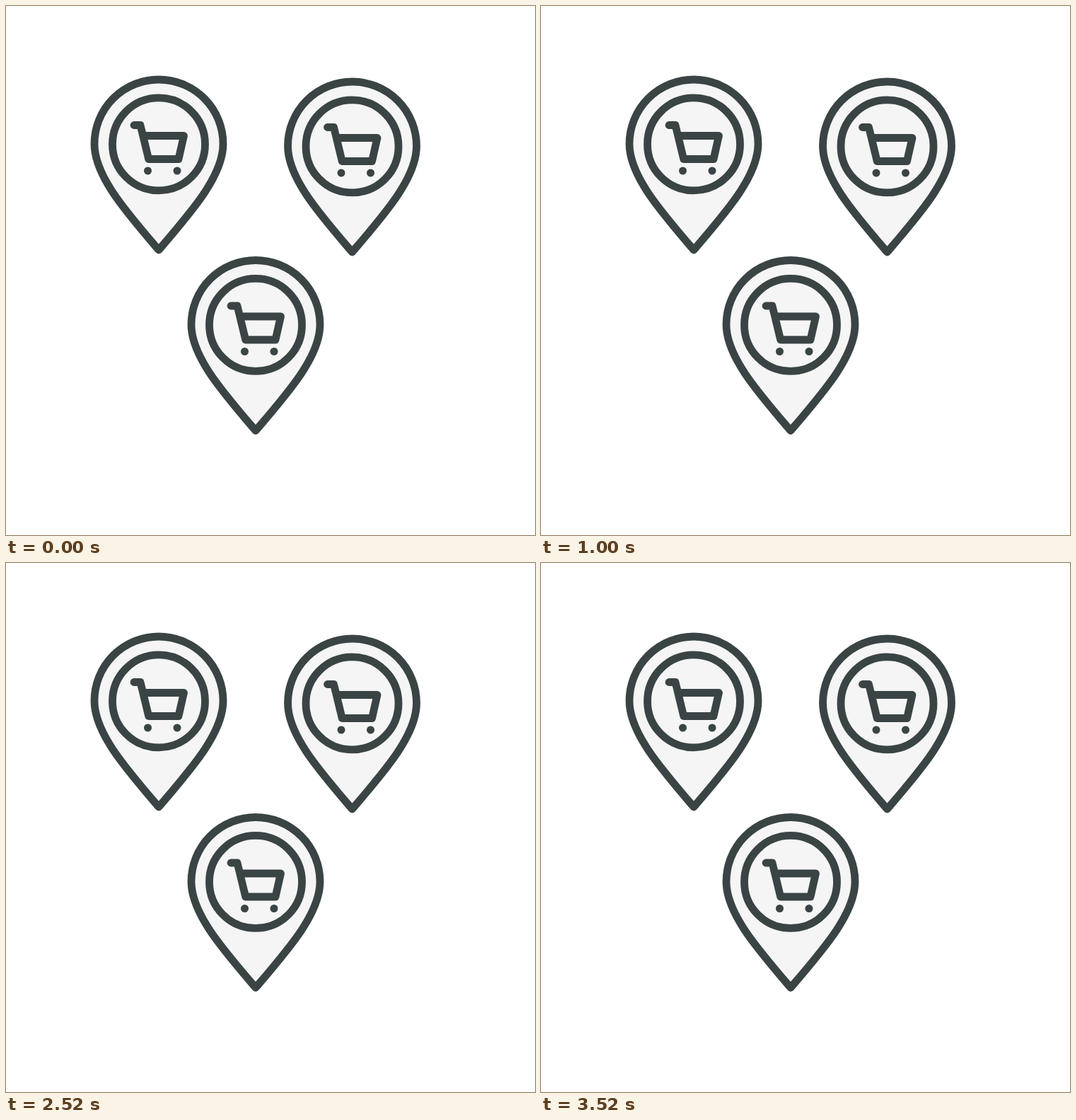
Recreate the animation shown at these times as an HTML page. Size 748 by 748 pixels, loop 4000 ms.

```html
<!DOCTYPE html>
<html lang="en">
<head>
<meta charset="utf-8">
<title>Shop pins</title>
<style>
  html, body { margin: 0; width: 100%; height: 100%; overflow: hidden; background: #fff; }
  svg { display: block; width: 100%; height: 100%; }
</style>
</head>
<body>
<svg viewBox="0 0 748 748">
  <defs>
    <!-- The point of the pin is the origin, so scaling grows it from there. -->
    <g id="pin" transform="translate(0 -155.5)" fill="none" stroke="#3a4444" stroke-width="10.8"
       stroke-linejoin="round" stroke-linecap="round">
      <path fill="#f5f5f5" d="M0 150C-47 95-91 45-91 0A91 91 0 0 1 91 0C91 45 47 95 0 150Z"/>
      <circle cy="0.4" r="65.5"/>
      <path d="M-35-26.5H-26L-22.3-11.5H35.5L28 21.5H-14.3L-22.3-11.5"/>
      <g fill="#3a4444" stroke="none">
        <circle cx="-15.5" cy="38" r="5.5"/>
        <circle cx="26" cy="38" r="5.5"/>
      </g>
    </g>
  </defs>
</svg>
<script>
  const LOOP = 4000, STEP = 40, PULSE = 480, GROWTH = 0.11;
  const svg = document.querySelector('svg');

  const pins = [
    { x: 216, y: 350.5, start: 2020 },
    { x: 489.5, y: 353.5, start: 3020 },
    { x: 353, y: 606, start: 520 },
  ];

  for (const pin of pins) {
    pin.el = document.createElementNS(svg.namespaceURI, 'use');
    pin.el.setAttribute('href', '#pin');
    svg.append(pin.el);
  }

  // One smooth swell and return.
  function pulse(t) {
    const p = Math.min(1, Math.max(0, t / PULSE));
    return (1 - Math.cos(2 * Math.PI * p)) / 2;
  }

  function render(ms) {
    const t = Math.floor((ms % LOOP) / STEP) * STEP;
    for (const { el, x, y, start } of pins) {
      const scale = 1 + GROWTH * pulse(t - start);
      el.setAttribute('transform', `translate(${x} ${y}) scale(${scale})`);
    }
  }

  const began = performance.now();
  function tick() {
    render(performance.now() - began);
    requestAnimationFrame(tick);
  }
  tick();
</script>
</body>
</html>
```
